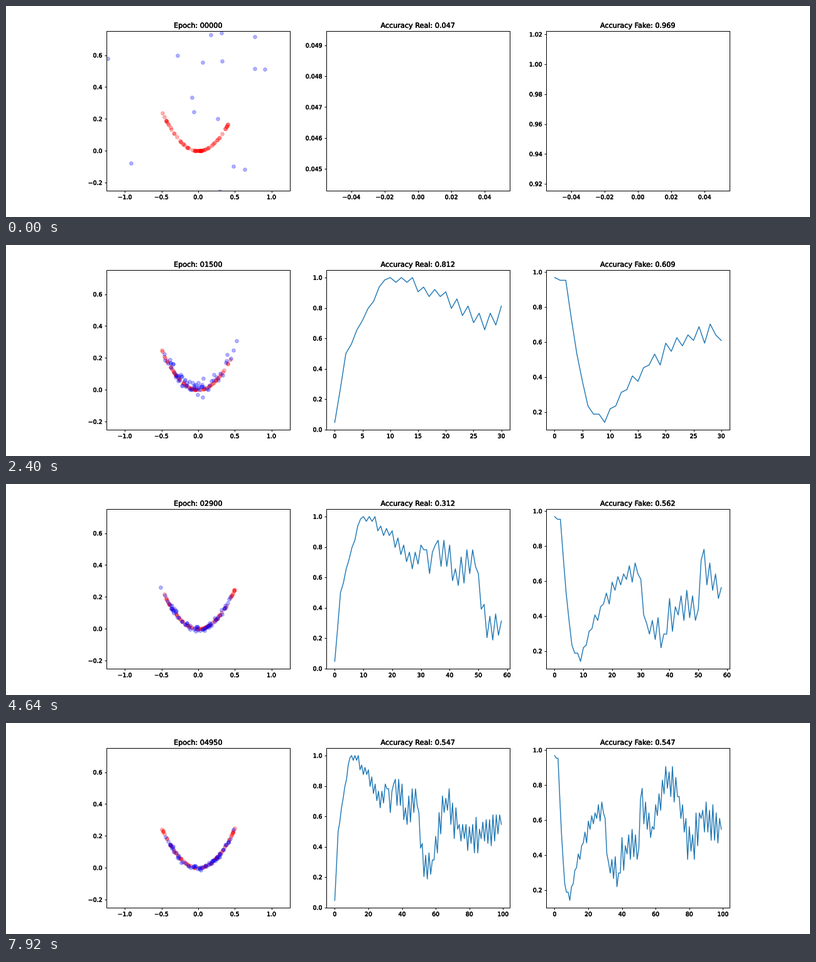
A matplotlib script that plays this animation: 1280x337 px, repeating every 8000 ms.

```python
import matplotlib.pyplot as plt
import numpy as np
from matplotlib import patheffects
from matplotlib.animation import FuncAnimation

W, H = 1280, 337
DPI = W / 19
PIXEL = 72 / DPI
FRAMES, INTERVAL = 100, 80
BATCH = 64

plt.rcParams.update({
    "font.family": "DejaVu Sans",
    "font.size": 10,
    "axes.linewidth": PIXEL,
    "xtick.major.width": PIXEL,
    "ytick.major.width": PIXEL,
    "figure.subplot.left": 0.125,
    "figure.subplot.right": 0.9,
    "figure.subplot.bottom": 0.125,
    "figure.subplot.top": 0.88,
})

# Turning points of each curve: (step, hits per batch)
REAL_KEYS = [(0, 3), (2, 32), (6, 51), (9, 63), (14, 64), (17, 56), (20, 58),
             (25, 45), (31, 50), (33, 40), (35, 52), (42, 42), (49, 43),
             (53, 13), (58, 20), (66, 46), (73, 33), (87, 29), (99, 35)]
FAKE_KEYS = [(0, 62), (2, 61), (4, 34), (6, 15), (9, 9), (12, 20), (17, 30),
             (24, 41), (29, 41), (32, 23), (38, 19), (42, 29), (50, 28),
             (51, 46), (58, 36), (68, 56), (73, 47), (81, 27), (87, 39),
             (99, 35)]


def accuracy_curve(keys, seed):
    """Join the turning points and add jitter that grows between them."""
    rng = np.random.default_rng(seed)
    steps, hits = np.array(keys).T
    t = np.arange(FRAMES)
    jitter = rng.uniform(2, 8, FRAMES) * (-1.0) ** t * np.clip(t / 40, 0.1, 1)
    jitter[steps] = 0
    curve = np.interp(t, steps, hits) + jitter
    return np.round(np.clip(curve, hits.min(), BATCH)) / BATCH


def real_points(step):
    rng = np.random.default_rng(100 + step)
    x = rng.uniform(-0.5, 0.41 + 0.09 * min(step / 40, 1), BATCH)
    return np.column_stack([x, x ** 2])


def fake_points(step):
    """A wide cloud that first shrinks, then settles on the parabola."""
    rng = np.random.default_rng(500 + step)
    fast, slow = np.exp(-step / 4), np.exp(-(step / 25) ** 2)
    wide = 0.7 * fast + 0.1 * slow + 0.02
    noise = fast + 0.045 * slow + 0.009
    x = rng.uniform(-0.45, 0.47, BATCH) + wide * rng.standard_t(3, BATCH)
    y = x ** 2 + 0.04 * slow + rng.normal(0, noise, BATCH)
    return np.column_stack([x, y])


def thicken(text):
    text.set_path_effects([
        patheffects.Stroke(linewidth=0.5, foreground="black"),
        patheffects.Normal(),
    ])


fig, (cloud, real_ax, fake_ax) = plt.subplots(
    1, 3, figsize=(W / DPI, H / DPI), dpi=DPI, facecolor="white")
axes = (cloud, real_ax, fake_ax)

cloud.set_xlim(-1.25, 1.25)
cloud.set_ylim(-0.25, 0.75)
red = cloud.scatter([], [], color="red", alpha=0.3)
blue = cloud.scatter([], [], color="blue", alpha=0.3)

curves = [
    (real_ax, real_ax.plot([], [])[0], "Real", accuracy_curve(REAL_KEYS, 3)),
    (fake_ax, fake_ax.plot([], [])[0], "Fake", accuracy_curve(FAKE_KEYS, 8)),
]


def update(step):
    red.set_offsets(real_points(step))
    blue.set_offsets(fake_points(step))
    cloud.set_title(f"Epoch: {step * 50:05d}")
    for ax, line, name, accuracy in curves:
        line.set_data(np.arange(step + 1), accuracy[:step + 1])
        ax.relim()
        ax.autoscale_view()
        ax.set_title(f"Accuracy {name}: {accuracy[step]:.3f}")
    for ax in axes:
        for text in [ax.title, *ax.get_xticklabels(), *ax.get_yticklabels()]:
            thicken(text)
    return []


anim = FuncAnimation(fig, update, frames=FRAMES, interval=INTERVAL,
                     init_func=lambda: update(0), repeat=True,
                     cache_frame_data=False)
plt.show()
```
